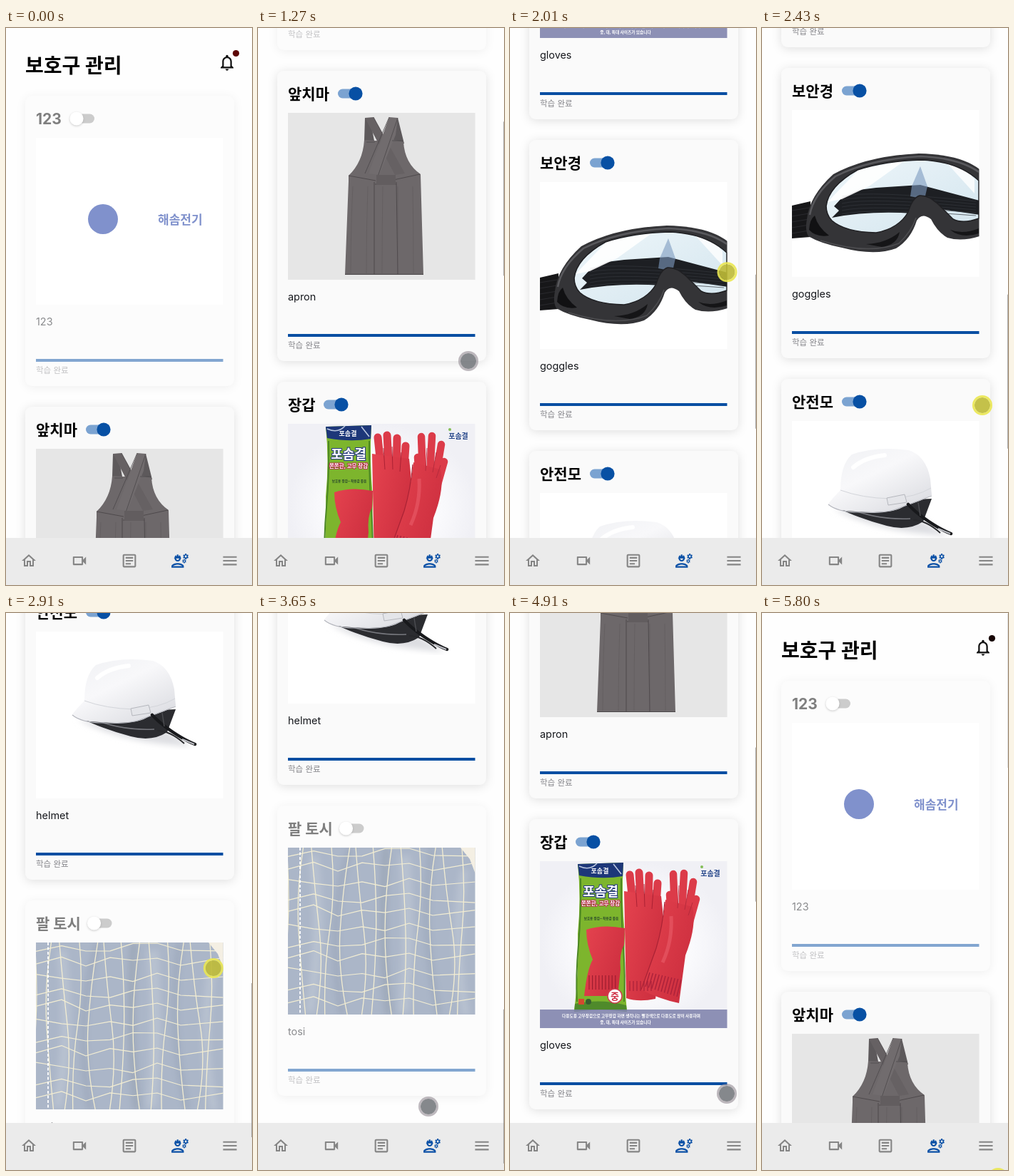
An HTML page that plays this animation: 345x781 px, repeating every 5850 ms.

```html
<!DOCTYPE html>
<html lang="ko">
<head>
<meta charset="utf-8">
<title>보호구 관리</title>
<style>
  html, body { margin: 0; width: 100%; height: 100%; overflow: hidden; background: #fefefe; }
  svg { display: block; }
  text { font-family: Inter, "Noto Sans CJK KR", "Noto Sans CJK", sans-serif; }
  #stage { position: fixed; inset: 0; overflow: clip; contain: strict; }
  #page, #nav, #thumb, #cursor { position: absolute; left: 0; top: 0; }
  #page { will-change: transform; }
  #nav { top: 715px; background: #ebebeb; }
  #thumb { left: 344px; width: 1px; height: 216px; background: #858585; }
  #cursor { width: 22px; height: 22px; margin: -14px; border-radius: 50%; border: 3px solid; background-clip: padding-box; }
  #cursor.down { background-color: rgba(112, 116, 120, .85); border-color: rgba(150, 143, 150, .62); }
  #cursor.up { background-color: rgba(190, 187, 55, .9); border-color: rgba(234, 231, 80, .9); }
  .card { filter: drop-shadow(0 2px 7px rgba(0, 0, 0, .12)); }
  .name { font-size: 21px; font-weight: 700; }
  .label { font-size: 14.4px; fill: #16181d; }
  .done { font-size: 11.5px; fill: #85858a; }
</style>
</head>
<body>
<div id="stage">
  <div id="page"></div>
  <div id="nav"></div>
  <div id="thumb"></div>
  <div id="cursor"></div>
</div>
<script>
const LOOP = 5850, CARD_TOP = 95, CARD_STEP = 436, THUMB_RATIO = 0.2767;

// Runs of picture changes: start, end, number of steps
const RUNS = [
  [760, 1330, 11], [1380, 1960, 12], [2010, 2590, 12], [2640, 3180, 11],
  [3230, 3810, 12], [3860, 4440, 12], [4500, 5070, 12], [5130, 5340, 5], [5640, 5800, 3]
];
const TICKS = [0];
for (const [a, b, n] of RUNS)
  for (let i = 0; i < n; i++) TICKS.push(Math.round((a + (b - a) * i / (n - 1)) / 10) * 10);

// time, scroll offset
const SCROLL = [
  [760, 0], [820, 20], [1000, 290], [1180, 405], [1270, 471], [1400, 640], [1600, 865],
  [1700, 972], [1850, 1135], [1960, 1225], [2150, 1305], [2430, 1347], [2500, 1362],
  [2700, 1660], [2850, 1830], [3000, 1935], [3180, 1995], [3280, 2005], [4470, 2005],
  [4600, 1610], [4740, 1022], [4910, 678], [5070, 370], [5130, 270], [5230, 110], [5340, 0]
];
// time, x, y, pressed
const POINTER = [
  [760, 318, 695, 0], [820, 316, 690, 1], [1000, 300, 330, 0], [1180, 297, 560, 1],
  [1270, 295, 467, 1], [1400, 297, 290, 0], [1600, 312, 685, 1], [1700, 310, 575, 1],
  [1850, 306, 400, 1], [1960, 304, 320, 0], [2430, 309, 529, 0], [2500, 309, 600, 1],
  [2700, 298, 270, 0], [3050, 286, 650, 1], [3300, 255, 330, 0], [3550, 240, 699, 1],
  [3650, 239, 692, 1], [3810, 237, 690, 0], [3900, 233, 716, 0], [4150, 246, 520, 0],
  [4440, 260, 322, 1], [4600, 285, 650, 0], [4740, 298, 330, 1], [4910, 304, 674, 1],
  [4960, 307, 690, 0], [5130, 325, 716, 0], [5290, 362, 717, 0], [5640, 362, 820, 0],
  [5720, 331, 815, 0], [5800, 331, 792, 0]
];

const line = (d, color, w = 1, more = '') =>
  `<path d="${d}" fill="none" stroke="${color}" stroke-width="${w}" ${more}/>`;
const shape = (d, fill, more = '') => `<path d="${d}" fill="${fill}" ${more}/>`;
const rect = (x, y, w, h, fill, more = '') =>
  `<rect x="${x}" y="${y}" width="${w}" height="${h}" fill="${fill}" ${more}/>`;
const disc = (x, y, r, fill, more = '') => `<circle cx="${x}" cy="${y}" r="${r}" fill="${fill}" ${more}/>`;
const text = (x, y, s, more = '') => `<text x="${x}" y="${y}" ${more}>${s}</text>`;
const range = (n, f) => Array.from({ length: n }, (_, i) => f(i)).join('');

function emblem() {
  return rect(42, 154, 263, 235, '#fff') + disc(136, 268, 21, '#02249a') +
    text(213, 274.5, '해솜전기', 'font-size="17" font-weight="700" fill="#02249a"');
}

function apron() {
  const cloth = '#6d686a', seam = '#4b4749';
  return rect(42, 119, 263, 235, '#e6e6e6') +
    shape('M150 126L157 126L163 158H149Z', '#5d595b') + shape('M189 126L196 126L205 162H188Z', '#5d595b') +
    shape('M149 157Q147 188 127 207V215L122 346H232L228 205Q206 190 204 160L187 156L166 158Z', cloth) +
    shape('M150 126L162 125L206 204L192 206Z', '#666163') +
    shape('M184 125L196 126L193 150L170 206L155 204Z', '#716c6e') +
    line('M184 125L150 204M196 126L168 208M162 125L174 147M152 160H164M188 158H203', seam, .8) +
    line('M127 207L165 214M190 213L227 205M163 216V346M194 216L196 346M164 219H194', seam, .9) +
    rect(166, 206, 27, 14, '#625d5f') +
    range(5, i => line(`M${133 + i * 21} 222Q${130 + i * 22} 280 ${130 + i * 22} 344`, '#5f5a5c', .6)) +
    line('M122 345.5H232', seam, 1);
}

function gloves() {
  const finger = (d, w) => line(d, '#dc3b49', w, 'stroke-linecap="round"');
  const small = (x, y, s, size, fill, more = '') =>
    text(x, y, s, `font-size="${size}" font-weight="700" fill="${fill}" text-anchor="middle" ${more}`);
  return rect(42, 348, 263, 235, 'url(#paper)') +
    finger('M168 367L174 425M181 364L184 420M195 368L194 420M207 379L204 425', 11) +
    shape('M160 390L212 397Q218 440 212 480L204 541Q180 546 163 540Z', 'url(#rubber)') +
    line('M176 382L178 412M188 380L189 412M201 388L199 415', '#a51f31', .9) +
    finger('M224 395L226 425M229 366L231 420M244 365L241 420M257 377L249 425M261 401L250 440', 10.5) +
    shape('M218 402L256 412Q262 440 246 480L237 547Q208 541 184 528L205 470Q214 440 218 402Z', 'url(#rubber)') +
    line('M217 405Q214 440 205 470L184 528', '#a92234', 1.2) +
    line('M237 382L235 414M250 388L245 416M256 406L250 424', '#b32a3b', .9) +
    line('M226 425Q228 460 214 490', '#ee6570', 5, 'opacity=".5"') +
    range(11, i => line(`M${196 + i * 4.4} ${504 + i}L${190 + i * 4.4} ${524 + i * 1.4}`, '#a8203a', 1.3)) +
    range(7, i => line(`M${168 + i * 5} 516V530`, '#a8203a', 1.2)) +
    shape('M95 352L159 350Q156 400 161 450Q159 510 164 559Q128 554 90 559Q97 500 95 450Q100 400 95 352Z', '#7db52d') +
    shape('M91 548Q128 540 163 550L164 559Q128 554 90 559Z', '#4f8a2b') +
    shape('M95 352L159 350L158 369Q130 374 97 368Z', '#1d3779') +
    line('M97 355Q112 362 122 351M145 352L156 366', '#b8c5df', 1.6) +
    line('M99 372Q100 420 96 465T94 545M156 372Q156 430 159 470T160 545', '#4c8724', 2) +
    small(126, 365, '포솜결', 9, '#fff') +
    small(127, 397, '포솜결', 18, '#fff', 'stroke="#283b80" stroke-width="2" paint-order="stroke"') +
    small(127, 410, '쫀쫀한, 고무 장갑', 7.5, '#fff', 'stroke="#b52545" stroke-width="1.5" paint-order="stroke"') +
    small(128, 430, '보호용 장갑~ 착용감 좋음', 4.6, '#24412c') +
    shape('M107 444Q130 436 161 442L160 465Q153 478 155 500L151 537H104Q108 500 116 486Q107 465 107 444Z', 'url(#rubber)') +
    range(9, i => line(`M${111 + i * 4.6} 508V528`, '#9d1d30', 1.2)) +
    disc(147, 537, 10, '#fff', 'stroke="#d13c50" stroke-width="1.5"') +
    small(147, 542, '중', 13, '#ce2e43') +
    rect(96, 541, 8, 8, '#d4492f') + disc(110, 545, 4, '#365e30') +
    disc(269, 356, 2, '#82bd55') + small(281, 369, '포솜결', 10, '#25468a') +
    rect(42, 556, 263, 27, '#8083ac', 'opacity=".88"') +
    small(170, 567, '다용도용 고무장갑으로 고무장갑 하면 생각나는 빨강색으로 다용도로 많이 사용하며', 5.7, '#fff') +
    small(162, 575.5, '중, 대, 특대 사이즈가 있습니다', 5.7, '#fff');
}

const LENS = 'M90 250Q93 222 134 199Q174 186 224 185Q275 187 304 214V267Q282 275 268 268L247 247Q233 234 221 235Q211 238 205 258Q192 281 160 287Q116 286 98 270Q90 262 90 249Z';

function goggles() {
  return rect(42, 115, 263, 235, '#fff') +
    shape('M42 249L68 243V293L42 295Z', '#171719') +
    range(5, i => line(`M42 ${256 + i * 8}L66 ${252 + i * 8}`, '#303034', .8)) +
    shape('M63 268Q66 236 100 205Q148 179 220 176Q278 177 305 198V292Q280 300 260 294Q246 286 237 268Q224 258 217 270Q209 296 188 309Q158 320 112 308Q82 302 65 292Q60 283 63 268Z', '#343437') +
    line('M67 262Q72 234 103 208Q150 184 222 180Q276 182 304 202', '#59595d', 2.5) +
    shape(LENS, 'url(#glass)') +
    `<g clip-path="url(#lens)">` +
    shape('M112 238L136 227L160 224L222 220L305 242V262L238 252L212 260Q150 256 98 266L108 256L101 250Z', '#1d1f23') +
    range(6, i => line(`M112 ${236 + i * 5}Q150 ${227 + i * 5} 300 ${243 + i * 4}`, '#34373d', .7)) +
    shape('M210 222L222 194L232 222L228 240L208 236Z', '#7d9cc0', 'opacity=".6"') +
    shape('M92 244L136 198L200 186L150 222L112 240Z', '#fff', 'opacity=".9"') +
    shape('M258 188L298 232V212L276 188Z', '#fff', 'opacity=".8"') +
    `</g>` + line(LENS, '#1f1f22', 1.5) +
    shape('M66 283Q67 268 74 263Q78 279 94 291Q76 294 66 283Z', '#111113') +
    shape('M146 303Q174 302 193 286Q190 304 168 307Z', '#151517') +
    shape('M264 283Q282 290 304 281V288Q280 296 264 283Z', '#151517') +
    line('M82 298Q150 319 192 302Q210 285 216 266', '#4d4d50', 1.5);
}

function helmet() {
  return rect(42, 551, 263, 235, '#fff') +
    shape('M100 674Q150 700 215 708L262 713L225 690Z', '#dcdde1', 'filter="url(#soft)"') +
    shape('M96 668Q130 686 175 698Q205 706 226 692L238 660L150 664Z', '#2b2c30') +
    line('M128 676Q165 690 208 688', '#77787e', 1.5) +
    shape('M110 648Q110 612 126 598Q160 586 206 592Q230 600 236 632L238 655Q222 664 200 670Q185 682 132 678Q100 677 93 667Q100 658 110 648Z', 'url(#shell)') +
    line('M110 648Q140 659 180 660Q215 658 237 645', '#d3d5da', 1) +
    line('M93 668Q106 679 136 679Q174 681 190 674L238 656', '#b4b6bd', 1.1) +
    line('M128 616Q144 602 172 599', '#fff', 6, 'stroke-linecap="round"') +
    shape('M175 659L200 654L203 665L177 669Z', '#e4e5e9', 'stroke="#a9abb2" stroke-width=".8"') +
    line('M205 668Q216 680 234 692T265 709', '#18191c', 4.5, 'stroke-linecap="round"') +
    line('M212 690Q230 690 250 708', '#27282b', 1.8) +
    line('M219 665L222 684', '#4b4c50', 1.5) + line('M247 702L264 709', '#bcbdc3', 2);
}

function sleeve() {
  const fold = (d, c, w) => line(d, c, w, 'opacity=".4" filter="url(#soft)"');
  const wave = (i, p) => 6 * Math.sin(i * 2.1 + p) + 2 * Math.sin(i * 5 + p * 3);
  const down = i => {
    const x = 40 + i * 20.5;
    return line(`M${x + wave(i, 0)} 327Q${x + wave(i, 2)} 390 ${x + wave(i, 3)} 445T${x + wave(i, 5)} 565`, '#e6dba6', 1.3);
  };
  const across = j => {
    const y = 336 + j * 21;
    return line(`M42 ${y + wave(j, 1)}L78 ${y - 4 + wave(j, 3)}L112 ${y + 5}L146 ${y + wave(j, 2)}L178 ${y + wave(j, 4)}L212 ${y - 6}L245 ${y + 4}L306 ${y + wave(j, 2)}`,
      '#e6dba6', 1.2, 'stroke-linejoin="round"');
  };
  return rect(42, 329, 263, 235, '#596f92') +
    fold('M180 329Q170 440 184 564', '#1c3050', 12) + fold('M130 329Q95 430 118 564', '#22395f', 9) +
    fold('M244 329Q226 440 254 564', '#243b60', 9) + fold('M78 340Q92 450 72 560', '#98a6ba', 14) +
    fold('M206 340Q214 460 204 560', '#98a6ba', 16) + fold('M290 360Q270 460 292 564', '#98a6ba', 12) +
    range(13, down) + range(11, across) +
    shape('M284 329H305V366L297 345Z', '#e9dfc7') +
    line('M59 329V563', '#fff', 1.8, 'stroke-dasharray="4 2.5"');
}

// name, label, switch x, on, picture, top of the picture's own coordinates
const CARDS = [
  ['123', '123', 91, false, emblem, 154],
  ['앞치마', 'apron', 112, true, apron, 119],
  ['장갑', 'gloves', 92, true, gloves, 348],
  ['보안경', 'goggles', 112, true, goggles, 115],
  ['안전모', 'helmet', 112, true, helmet, 551],
  ['팔 토시', 'tosi', 115.5, false, sleeve, 329]
];

function card([name, label, sx, on, draw, top], i) {
  const knob = on
    ? disc(sx + 25, 32, 9.6, '#0750a4')
    : disc(sx + 8, 32, 9.6, '#fff', 'style="filter:drop-shadow(0 1px 1.5px rgba(0,0,0,.4))"');
  return `<g transform="translate(0 ${CARD_TOP + i * CARD_STEP})" opacity="${on ? 1 : .5}">` +
    rect(27, 0, 293, 407, '#fafafa', 'rx="9" class="card"') +
    text(42, 39.8, name, 'class="name"') +
    rect(sx, 25.5, 33, 13, on ? '#7ba3d1' : '#999', 'rx="6.5"') + knob +
    `<svg x="42" y="59" width="262.5" height="234" viewBox="42 ${top} 262.5 234">${draw()}</svg>` +
    text(42, 321.6, label, 'class="label"') +
    rect(42, 369, 262.5, 4, '#074ea2') +
    text(42, 389, '학습 완료', 'class="done"') + '</g>';
}

const icon = (cx, cy, size, d, fill) =>
  `<g transform="translate(${cx - size / 2} ${cy - size / 2}) scale(${size / 24})">${shape(d, fill)}</g>`;
const BELL = 'M12 22c1.1 0 2-.9 2-2h-4c0 1.1.9 2 2 2zm6-6v-5c0-3.07-1.63-5.64-4.5-6.32V4c0-.83-.67-1.5-1.5-1.5s-1.5.67-1.5 1.5v.68C7.64 5.36 6 7.92 6 11v5l-2 2v1h16v-1l-2-2zm-2 1H8v-6c0-2.48 1.51-4.5 4-4.5s4 2.02 4 4.5v6z';
const HOME = 'M12 5.69l5 4.5V18h-2v-6H9v6H7v-7.81l5-4.5M12 3L2 12h3v8h6v-6h2v6h6v-8h3L12 3z';
const VIDEO = 'M15 8v8H5V8h10m1-2H4c-.55 0-1 .45-1 1v10c0 .55.45 1 1 1h12c.55 0 1-.45 1-1v-3.5l4 4v-11l-4 4V7c0-.55-.45-1-1-1z';
const ARTICLE = 'M19 5v14H5V5h14m0-2H5c-1.1 0-2 .9-2 2v14c0 1.1.9 2 2 2h14c1.1 0 2-.9 2-2V5c0-1.1-.9-2-2-2zM14 17H7v-2h7v2zm3-4H7v-2h10v2zm0-4H7V7h10v2z';
const MENU = 'M3 18h18v-2H3v2zm0-5h18v-2H3v2zm0-7v2h18V6H3z';
const WORKER = 'M9 15c-2.67 0-8 1.34-8 4v2h16v-2c0-2.66-5.33-4-8-4zm-6 4c.22-.72 3.31-2 6-2 2.7 0 5.8 1.29 6 2H3zM4.74 9H5c0 2.21 1.79 4 4 4s4-1.79 4-4h.26c.27 0 .49-.22.49-.49v-.02c0-.27-.22-.49-.49-.49H13c0-1.48-.81-2.75-2-3.45v.95c0 .28-.22.5-.5.5s-.5-.22-.5-.5V4.14C9.68 4.06 9.35 4 9 4s-.68.06-1 .14V5.5c0 .28-.22.5-.5.5S7 5.78 7 5.5v-.95C5.81 5.25 5 6.52 5 8h-.26c-.27 0-.49.22-.49.49v.03c0 .26.22.48.49.48zM9 11c-1.1 0-2-.9-2-2h4c0 1.1-.9 2-2 2z';

function gear(x, y, r) {
  const teeth = range(6, i => `M0 0L${r * Math.sin(i * Math.PI / 3)} ${r * Math.cos(i * Math.PI / 3)}`);
  return `<g transform="translate(${x} ${y})">` + line(teeth, '#0b50a6', r * .5) +
    disc(0, 0, r * .72, '#0b50a6') + disc(0, 0, r * .36, '#ebebeb') + '</g>';
}

document.getElementById('page').innerHTML =
  `<svg width="345" height="2823"><defs>
    <radialGradient id="paper"><stop offset=".5" stop-color="#fdfdff"/><stop offset="1" stop-color="#f0f0f5"/></radialGradient>
    <linearGradient id="rubber" x2="1" y2=".6"><stop stop-color="#e5434f"/><stop offset="1" stop-color="#cd2f3f"/></linearGradient>
    <linearGradient id="glass" x2="1" y2="1"><stop stop-color="#eef6fa"/><stop offset="1" stop-color="#d3e5ee"/></linearGradient>
    <linearGradient id="shell" x2=".8" y2="1"><stop stop-color="#f0f1f4"/><stop offset=".45" stop-color="#f8f8fa"/><stop offset="1" stop-color="#dcdde2"/></linearGradient>
    <clipPath id="lens"><path d="${LENS}"/></clipPath>
    <filter id="soft" x="-2" width="5"><feGaussianBlur stdDeviation="4"/></filter></defs>` +
  text(27, 63.3, '보호구 관리', 'font-size="28" font-weight="700"') +
  icon(310, 48.5, 27, BELL, '#111') + disc(322.5, 35.5, 4.6, '#5c0505', 'id="dot"') +
  CARDS.map(card).join('') + '</svg>';

document.getElementById('nav').innerHTML = '<svg width="345" height="66">' +
  icon(32, 32, 24, HOME, '#858585') + icon(103, 32, 24.5, VIDEO, '#858585') +
  icon(173, 32, 25, ARTICLE, '#858585') + icon(314, 32, 25.5, MENU, '#858585') +
  icon(244, 32, 26, WORKER, '#0b50a6') + gear(252.1, 26, 3.9) + gear(250, 32.6, 2.8) + '</svg>';

const [page, thumb, cursor, dot] = ['page', 'thumb', 'cursor', 'dot'].map(id => document.getElementById(id));

function at(keys, t) {
  let i = 0;
  while (i < keys.length - 1 && keys[i + 1][0] <= t) i++;
  const a = keys[i], b = keys[i + 1];
  if (!b || t <= a[0]) return a;
  const k = (t - a[0]) / (b[0] - a[0]);
  return [t, a[1] + (b[1] - a[1]) * k, a[2] + (b[2] - a[2]) * k, a[3]];
}

const start = performance.now();
function paint(now) {
  const time = Math.max(0, now - start) % LOOP;
  const t = TICKS.findLast(tick => tick <= time);
  const moved = t >= 760;
  const y = Math.round(at(SCROLL, t)[1]);
  const [, px, py, down] = at(POINTER, t);
  page.style.transform = `translateY(${-y}px)`;
  thumb.style.transform = `translateY(${1 + y * THUMB_RATIO}px)`;
  thumb.style.opacity = !moved ? 0 : t < 5640 ? .65 : .65 - (t - 5580) / 550;
  dot.setAttribute('fill', moved ? '#160404' : '#5c0505');
  cursor.style.visibility = moved ? 'visible' : 'hidden';
  cursor.style.transform = `translate(${px}px, ${py}px)`;
  cursor.className = down ? 'down' : 'up';
  requestAnimationFrame(paint);
}
paint(start);
</script>
</body>
</html>
```
